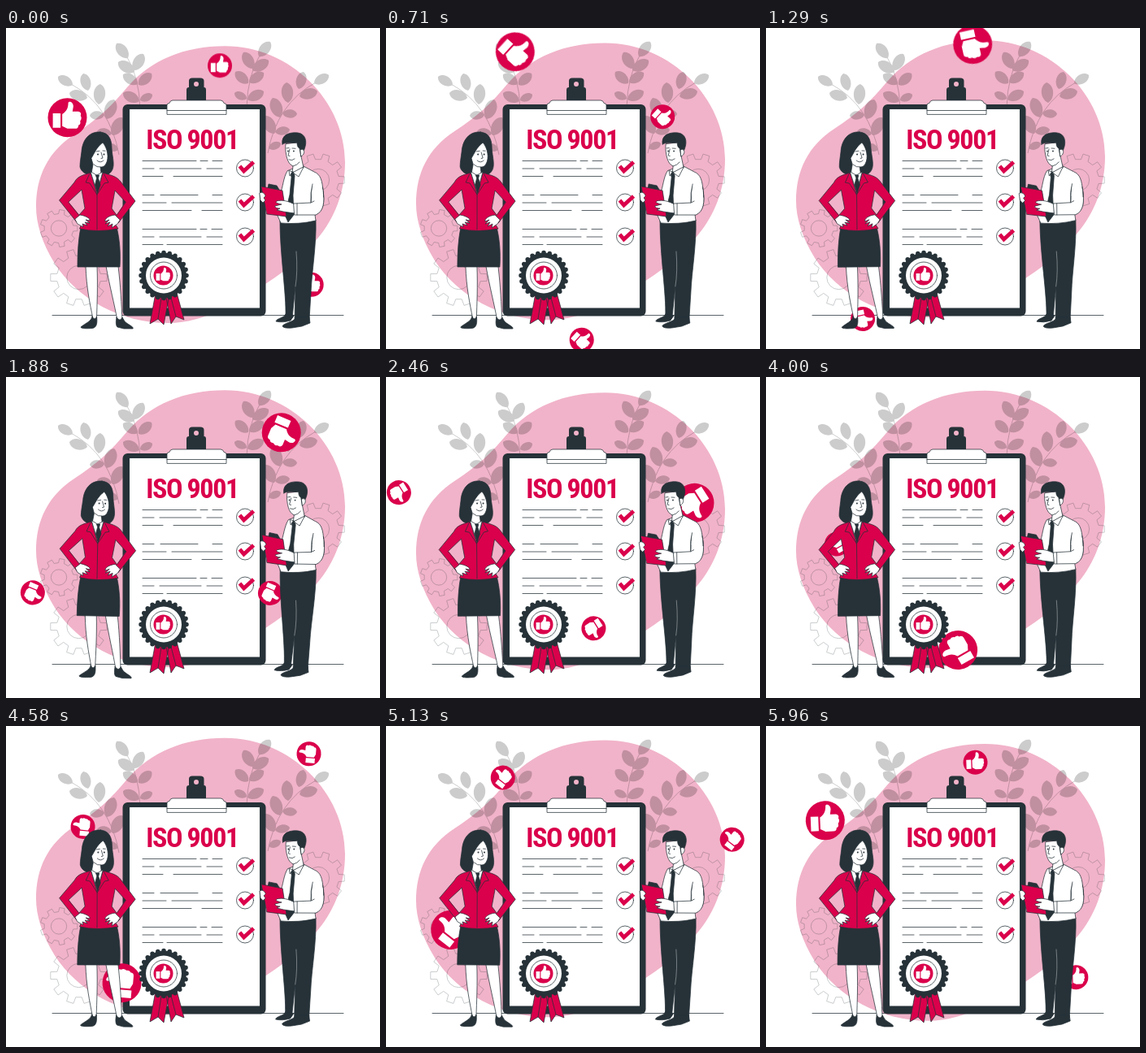
Recreate the animation shown at these times as an HTML page. Size 460 by 395 pixels, loop 6 s.

```html
<!DOCTYPE html>
<html lang="en">
<head>
<meta charset="utf-8">
<title>ISO 9001</title>
<style>
  html, body { margin: 0; width: 100%; height: 100%; overflow: hidden; background: #fff; }
  svg { display: block; width: 100vw; height: 100vh; }
  .red { fill: #da004b; }
  .dark { fill: #263238; }
  .white { fill: #fff; }
  .line { fill: none; }
  .ink { stroke: #263238; stroke-width: .75; stroke-linejoin: round; stroke-linecap: round; }
  .title { font: 700 34px "Roboto Condensed", "Liberation Sans Narrow", "Open Sans Condensed", Roboto, "Open Sans", sans-serif; font-stretch: 75%; letter-spacing: -1.4px; }
</style>
</head>
<body>
<svg id="stage" viewBox="0 0 460 395">
  <path id="blob" fill="#f1b3c9" d="M269 22.2C350 22 417 90 417 165C417 202 404 234 384 258C366 280 345 298 322 313C285 337 245 363 200 363C140 363 88 333 60 290C44 264 37 240 37 220C37 182 52 152 84 131C112 113 130 96 149 73C178 39 220 22.2 269 22.2Z"/>

  <g id="plants" opacity=".2">
    <g id="plant"></g>
    <use href="#plant" transform="translate(461 -2) scale(-1 1)"/>
  </g>
  <g id="gears" class="line" stroke="#263238" stroke-width=".7" opacity=".35"></g>
  <path class="ink" d="M57 353.500H415"/>

  <g id="board">
    <rect class="dark" x="143.500" y="94" width="176" height="260.500" rx="6"/>
    <rect class="white" x="152" y="100" width="160" height="244.500"/>
    <path class="dark" fill-rule="evenodd" d="M222 91V76Q222 73 225 73V65Q225 61.500 229 61.500H239Q243.500 61.500 243.500 65V73Q246 73 246 76V91ZM231 69a3 3 0 1 0 6 0a3 3 0 1 0-6 0Z"/>
    <path class="white ink" d="M198 106V95Q198 92.500 201 92.500Q202 89 205 89H264Q267 89 268 92.500Q271 92.500 271 95V106ZM198 101.500H271"/>
    <text class="title red" x="229" y="148.500" text-anchor="middle">ISO 9001</text>
    <g id="rows"></g>
  </g>

  <g id="orbit"></g>

  <g id="badge">
    <path class="red ink" d="M184 326L177 364L187 358L194 365L201 328ZM196 326L203 364L209 355L219 359L209 322ZM191 332L187 358M203 332L209 355"/>
    <circle class="dark" cx="194" cy="304.500" r="28"/>
    <circle class="line" cx="194" cy="304.500" r="28" stroke="#263238" stroke-width="5.500" stroke-linecap="round" stroke-dasharray="0 10" pathLength="240"/>
    <circle class="white" cx="194" cy="304.500" r="22"/>
    <circle class="line ink" cx="194" cy="304.500" r="16.500"/>
  </g>

  <g id="woman" class="ink">
    <path class="white" d="M98 293C99 320 103 338 107 358H111.500C112 340 113 318 112 293ZM123 293C128 320 133 338 137 360H143C142 340 141 318 138 293Z"/>
    <path class="dark" d="M106 355C105 361 98 363 92 368C92 370 100 370 106 369.500C112 369 112.500 362 111.500 355C110 359 108 359 106 355ZM136 356C135 361 135 366 137 368L145 370H156C158 368 150 365 146 361L143 356C141 360 139 360 136 356Z"/>
    <path class="dark" d="M92 245H136C140 260 141 278 140 294H88C88 276 89 260 92 245Z"/>
    <path class="dark" d="M116 128C102 127 94 138 93 152C92 160 91 165 91 171C93 179 102 182 112 182L126 180C136 173 131 162 130 148C130 136 126 129 116 128Z"/>
    <path class="white" d="M105 160C109 154 111 147 119 141C125 148 127 160 123 167C121 171 118 171 116 171L117 179L112 193L105 179L107 168Z"/>
    <path class="line" d="M111 152l4-.7M119 151l3 .2M117 153l2 7-2 .5M112 163q4 4 8 0M108 168q4 4 8 3"/>
    <path class="dark" stroke="none" d="M112 155.500a1 1 0 1 0 2 0a1 1 0 1 0-2 0M119.500 155.500a1 1 0 1 0 2 0a1 1 0 1 0-2 0"/>
    <path class="red" fill-rule="evenodd" d="M104 178C95 181 88 182 84 190L65.500 212L87 239L95 232C96 238 92 243 90.500 247Q112 252 138 247C135 242 131 237 131 231L138 240L159 213L141 189C136 182 128 181 119 178L112 204ZM77 214L93 199L97 222L90 230ZM147 214L134 200L130 222L136 230Z"/>
    <path class="white" d="M104 177L112 202L119 177L112 181Z"/>
    <path class="dark" d="M110.500 181H114.500L113.500 185L116 193L112.500 203L109.500 193L111.500 185Z"/>
    <path class="line" d="M103 179L98 190L103 191L112 205V248M120 179L126 190L121 191L112 205"/>
    <path class="white" d="M85 235L91 230C97 231 104 234 103 237L98 236L103 240L97 239L100 243L94 241L95 245L88 241ZM140 236L134 230C126 231 121 235 122 238L127 236L122 241L128 239L125 244L131 241L130 246L137 241Z"/>
  </g>

  <g id="man" class="ink">
    <path class="dark" d="M337 238L381 236C382 267 376 300 375 326L373 359L355 361L356 318L352 357L344 355C345 328 337 278 337 238Z"/>
    <path class="dark" d="M344 352C342 357 333 357 332 361Q340 363 350 360L354 354ZM356 357C354 362 341 363 340 367Q342 370 352 369L364 367L374 363L373 356Z"/>
    <path class="line" d="M357 275Q359 300 356 318" stroke="#fff" opacity=".5"/>
    <path class="white" d="M346 176C341 184 341 195 337 205L331 224L338 240Q360 242 381 237L380 230C391 226 392 213 390 201C389 188 387 180 379 177L364 169Z"/>
    <path class="white" d="M344 143C343 150 345 164 350 168L353 170L352 179L366 172L363 158L366 149L360 141Z"/>
    <path class="dark" d="M340 143C338 131 349 128 359 129C368 130 371 139 367 149L363 158L361 148C358 147 358 142 358 141C351 142 345 140 340 143Z"/>
    <path class="white" d="M362 150C367 147 369 155 363 158Z"/>
    <path class="line" d="M345 148l3-.5M352 148l4 .3M349 149l-2 8 2 .5M348 162q4 2 7-1M353 170q5-1 8-5"/>
    <path class="dark" stroke="none" d="M346 151.500a.9.9 0 1 0 1.800 0a.9.9 0 1 0-1.800 0M353 151.500a.9.9 0 1 0 1.800 0a.9.9 0 1 0-1.800 0"/>
    <path class="dark" d="M350 178L354 177L355 182L353 206L354 230L347 239L343 230L349 205L351 184Z"/>
    <path class="white" d="M352 177L349 182L348 176ZM353 178L360 183L366 171Z"/>
    <path class="dark" d="M322 197L323 192L333 194L336 199Z"/>
    <path class="red" d="M314 195L340 200L345 232L321 229Z"/>
    <path class="white" d="M312 203C315 201 319 204 319 207L317 209L319 212L316 215L313 212Z"/>
    <path class="white" d="M355 217C347 213 340 211 333 213C330 215 335 216 339 217L331 219C330 221 334 222 337 222L333 224L341 226L355 228Z"/>
    <path class="white" d="M354 216L375 215C376 207 375 199 378 192L390 201C392 213 391 226 381 230L355 230Z"/>
    <path class="line" d="M358 216V230M375 215L379 213"/>
    <path class="white" stroke="none" d="M377 190L390 199L389 207L376 207Z"/>
    <path class="line" d="M377 192Q374 203 375 214M389.500 196Q391 202 390.500 208"/>
  </g>
</svg>
<script>
const LOOP = 6000;
const CENTER = { x: 221, y: 176.7 };
const byId = id => document.getElementById(id);
const polar = (x, y, r, deg) => {
  const a = deg * Math.PI / 180;
  return [x + r * Math.cos(a), y + r * Math.sin(a)];
};

// A leaf runs from its base on the stem to its tip.
function leaf([x, y, tipX, tipY]) {
  const dx = tipX - x, dy = tipY - y, w = .38;
  const side = s => [.2, .85].map(k => `${x + dx * k - s * dy * w} ${y + dy * k + s * dx * w}`);
  const out = side(1).join(" "), back = side(-1).reverse().join(" ");
  return `M${x} ${y}C${out} ${tipX} ${tipY}C${back} ${x} ${y}Z`;
}

function gear(x, y, r, teeth, depth) {
  const points = [];
  for (let i = 0; i < teeth; i++) {
    [[-.28, depth], [-.2, 0], [.2, 0], [.28, depth]].forEach(([turn, cut]) =>
      points.push(polar(x, y, r - cut, (i + turn) * 360 / teeth).map(v => v.toFixed(1)).join(" ")));
  }
  return `M${points.join("L")}Z`;
}

const thumb = (x, y, r) => `
  <g transform="translate(${x} ${y}) scale(${r / 24})">
    <circle class="red" r="24"/>
    <path class="white" transform="scale(1.05)" d="M-17-5H-8V12H-17ZM-6-4C-1-7 1-11 1-17C1-20 7-19 7-13L6-7H13Q17-6 15.500-2Q17.500 1 15 4Q16 8 13 9Q13 13 9 13H0L-6 10Z"/>
  </g>`;

const leaves = [
  [82, 70, 64, 60], [101, 77, 95, 56], [100, 86, 78, 80], [114, 94, 116, 69], [121, 107, 103, 108],
  [124, 112, 133, 88], [130, 130, 112, 127], [131, 132, 143, 110], [138, 150, 123, 144],
  [150, 37, 136, 19], [157, 52, 169, 32], [158, 54, 138, 42], [163, 70, 179, 56],
  [162, 69, 144, 57], [165, 89, 180, 82], [164, 90, 144, 80]
];
byId("plant").innerHTML = `<path d="${leaves.map(leaf).join("")}"/>
  <path fill="none" stroke="#000" d="M80 69Q128 95 139 156M148 34Q164 60 165 100"/>`;

byId("gears").innerHTML = [[65, 246.5, 23, 9, 5], [89.5, 307, 35, 10, 8], [384, 187, 32.5, 10, 7]]
  .map(([x, y, r, teeth, depth]) => `<path d="${gear(x, y, r, teeth, depth)}"/>
    <circle cx="${x}" cy="${y}" r="${r * .42}"/>`).join("");

const rows = [
  "M168 163.500H234M239 163.500H248M254 163.500H266M168 173H182M189 173H240M247 173H266M168 182.500H193M206 182.500H266",
  "M168 205.500H182M190 205.500H236M254 205.500H266M168 215H197M204 215H266M168 224.500H228M241 224.500H266",
  "M168 247.500H234M239 247.500H247M253 247.500H266M168 257H182M189 257H240M247 257H266M168 266.500H193M198 266.500H266"
];
byId("rows").innerHTML = rows.map((d, i) => `
  <path class="line ink" d="${d}"/>
  <g transform="translate(294 ${172.5 + i * 42})">
    <circle class="white ink" r="10.500"/>
    <path fill="none" stroke="#da004b" stroke-width="4.800" d="M-6.500-2.500L-1.500 3.500L10.500-7.500"/>
  </g>`).join("");

byId("orbit").innerHTML = [[160, 204.5, 24], [137, -72.2, 15], [208, 41.9, 15]]
  .map(([reach, deg, r]) => thumb(...polar(CENTER.x, CENTER.y, reach, deg), r)).join("");

byId("badge").insertAdjacentHTML("beforeend", thumb(193.5, 304.5, 12));

// Linear sway: 0, +1 degree at a quarter, -1 degree at three quarters.
function sway(phase) {
  if (phase < .25) return phase * 4;
  return phase < .75 ? 2 - phase * 4 : phase * 4 - 4;
}

function draw(now) {
  const t = now % LOOP;
  const float = 1 - Math.abs(1 - (t % 3000) / 1500);
  const tilt = sway((t % 1500) / 1500);
  byId("blob").setAttribute("transform", `translate(0 ${-8 * float})`);
  byId("orbit").setAttribute("transform", `rotate(${t / LOOP * 360} ${CENTER.x} ${CENTER.y})`);
  byId("woman").setAttribute("transform", `rotate(${tilt} 112 249)`);
  byId("man").setAttribute("transform", `rotate(${tilt} 352 249)`);
}

const start = performance.now();
function tick() {
  draw(performance.now() - start);
  requestAnimationFrame(tick);
}
tick();
</script>
</body>
</html>
```
